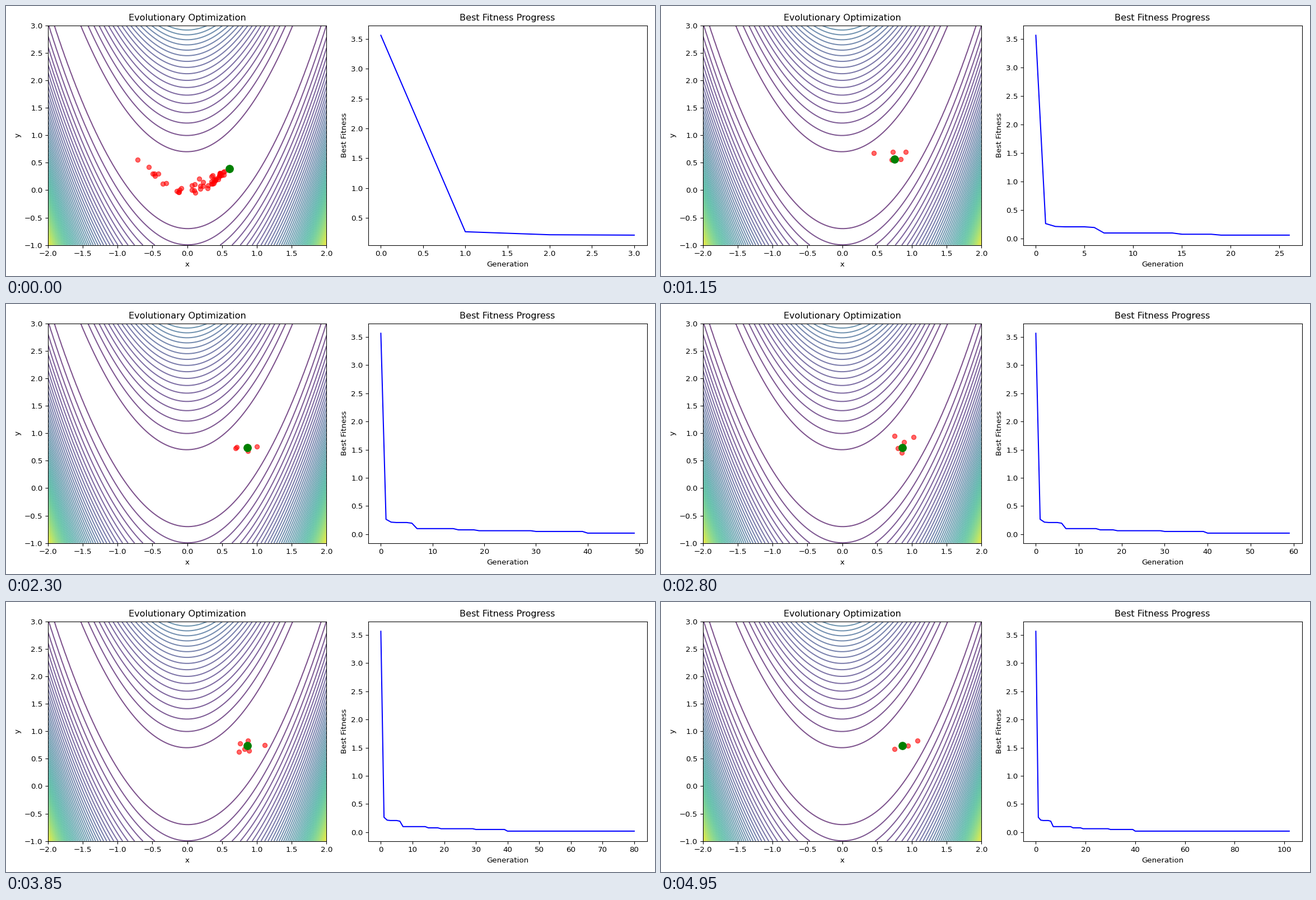
These frames come from a looping animation (1159x483 px, 5 s). A matplotlib script:

```python
import numpy as np
import matplotlib.pyplot as plt
from matplotlib.animation import FuncAnimation

WIDTH = 1159
FRAMES, INTERVAL = 100, 50
FIRST_GEN = 3
POP, MUTATION_RATE, SIGMA = 50, 0.1, 0.1

# Best individual, keyed by the generation that found it
BEST = {0: (.4, .339), 1: (.52, .289), 2: (.56, .328), 3: (.608, .393),
        6: (.6, .379), 7: (.695, .4747), 15: (.725, .5207),
        19: (.752, .5623), 30: (.784, .6095), 40: (.86, .738)}


def rosenbrock(x, y):
    return (1 - x) ** 2 + 100 * (y - x ** 2) ** 2


def best_at(gen):
    return BEST[max(g for g in BEST if g <= gen)]


def make_cloud():
    """Individuals strung along the valley, densest near its right end."""
    rng = np.random.default_rng(4)
    u = np.linspace(0, 1, POP)
    spread = 0.03 + 0.04 * u
    x = 0.47 - 1.15 * u ** 3 + spread * rng.normal(size=POP)
    y = x ** 2 + 0.04 + spread * rng.normal(size=POP)
    return np.column_stack([x, y])


def population(gen):
    """Cloud collapsing onto the best point, plus fresh mutants."""
    best = np.array(best_at(gen))
    core = best + (CLOUD - best) * 0.5 ** (gen - FIRST_GEN)
    if gen == FIRST_GEN:
        return core
    rng = np.random.default_rng(gen)
    n = rng.binomial(POP, MUTATION_RATE)
    return np.vstack([core, best + SIGMA * rng.normal(size=(n, 2))])


CLOUD = make_cloud()
HISTORY = [rosenbrock(*best_at(g)) for g in range(FRAMES + FIRST_GEN)]

fig, (ax1, ax2) = plt.subplots(1, 2, figsize=(12, 5.001), dpi=WIDTH / 12)

X, Y = np.meshgrid(np.linspace(-2, 2, 100), np.linspace(-1, 3, 100))
ax1.contour(X, Y, rosenbrock(X, Y), levels=50, cmap="viridis", alpha=0.7)
points, = ax1.plot([], [], "ro", alpha=0.6)
best_dot, = ax1.plot([], [], "go", markersize=10)
ax1.set(title="Evolutionary Optimization", xlabel="x", ylabel="y",
        xlim=(-2, 2), ylim=(-1, 3))

curve, = ax2.plot([], [], "b-")
ax2.set(title="Best Fitness Progress", xlabel="Generation",
        ylabel="Best Fitness")


def update(i):
    gen = i + FIRST_GEN
    points.set_data(*population(gen).T)
    bx, by = best_at(gen)
    best_dot.set_data([bx], [by])
    curve.set_data(range(gen + 1), HISTORY[:gen + 1])
    ax2.relim()
    ax2.autoscale_view()
    return points, best_dot, curve


update(0)
fig.tight_layout()
anim = FuncAnimation(fig, update, frames=FRAMES, interval=INTERVAL,
                     init_func=lambda: update(0), repeat=True, repeat_delay=0)
plt.show()
```
